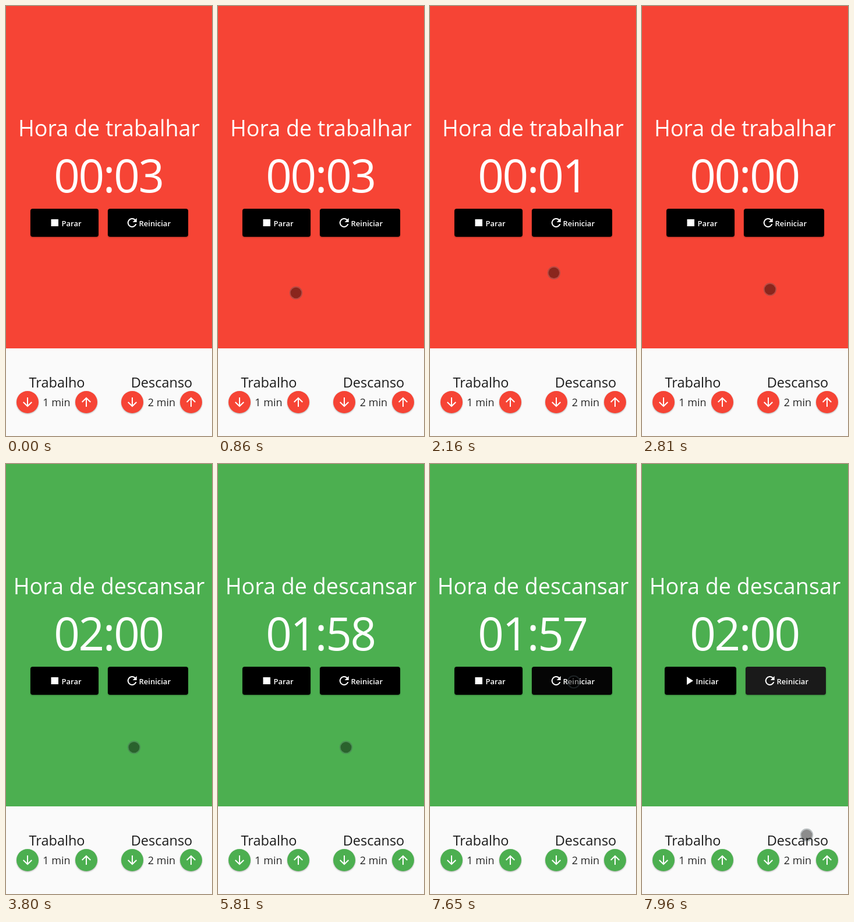
These frames come from a looping animation (354x736 px, 7.99 s). An HTML page:

```html
<!DOCTYPE html>
<html lang="pt">
<head>
<meta charset="utf-8">
<title>Temporizador</title>
<style>
  html, body { margin: 0; width: 100%; height: 100%; overflow: hidden; }
  svg { display: block; width: 100vw; height: 100vh; font-family: "Open Sans", "Noto Sans", sans-serif; }
  .center { text-anchor: middle; }
  .title { font-size: 37.7px; fill: #fff; }
  .timer { font-size: 78px; letter-spacing: -.03em; fill: #fff; }
  .raised { filter: drop-shadow(0 1.5px 1px rgba(0, 0, 0, .3)); }
  .label { font-size: 13px; font-weight: 600; fill: #fff; }
  .heading { font-size: 23.5px; fill: #1c1c1c; }
  .minutes { font-size: 18px; fill: #262626; }
</style>
</head>
<body>
<svg id="stage" viewBox="0 0 354 736">
  <defs>
    <path id="arrow" d="M0-8V7M-7.3 0L0 7L7.3 0" fill="none" stroke="#fff" stroke-width="2"/>
    <g id="stepper">
      <g class="raised" fill="currentColor">
        <circle cx="-50.5" r="19"/>
        <circle cx="50.5" r="19"/>
      </g>
      <use href="#arrow" x="-50.5"/>
      <use href="#arrow" x="-50.5" transform="rotate(180)"/>
    </g>
  </defs>

  <rect width="354" height="736" fill="#fafafa"/>
  <rect width="354" height="586" fill="currentColor"/>
  <text id="title" class="center title" x="177" y="223"></text>
  <text id="timer" class="center timer" x="176" y="319"></text>

  <g id="stop">
    <rect class="raised" x="42" y="347" width="117" height="48" rx="4"/>
    <path d="M77.5 365h12.5v12h-12.5z" fill="#fff"/>
    <text class="label" x="95.5" y="377">Parar</text>
  </g>
  <g id="start">
    <rect class="raised" x="39" y="347" width="123" height="48" rx="4"/>
    <path d="M77 364v14l11-7z" fill="#fff"/>
    <text class="label" x="92.5" y="377">Iniciar</text>
  </g>
  <g id="restart">
    <rect class="raised" x="175" y="347" width="138" height="48" rx="4"/>
    <rect id="highlight" x="175" y="347" width="138" height="48" rx="4" fill="#fff"/>
    <path transform="translate(204.7 359)" fill="#fff" d="M17.65 6.35A8 8 0 1 0 19.73 14h-2.08A6 6 0 1 1 16.22 7.78L13 11h7V4z"/>
    <text class="label" x="228.5" y="377">Reiniciar</text>
  </g>

  <text class="center heading" x="87.5" y="653">Trabalho</text>
  <text class="center heading" x="267.5" y="653">Descanso</text>
  <text class="center minutes" x="87" y="685">1 min</text>
  <text class="center minutes" x="267.5" y="685">2 min</text>
  <use href="#stepper" x="87.5" y="678"/>
  <use href="#stepper" x="267.5" y="678"/>

  <g id="cursor">
    <circle r="10.2" fill="none" stroke="rgba(75,90,95,.36)" stroke-width="2"/>
    <circle r="9.3" fill="rgba(0,0,0,.44)"/>
  </g>
</svg>
<script>
  const LOOP = 7990, ENTER = 330, REST = 3800, PRESS = 7610, RESET = 7710;
  const el = id => document.getElementById(id);
  const clamp = v => Math.max(0, Math.min(1, v));
  const progress = (t, from, to) => clamp((t - from) / (to - from));
  const mix = (a, b, u) => a + (b - a) * u;

  // Places where the pointer rests.
  const edge = [331, 734], left = [134, 491], middle = [220, 485], button = [247, 373], exit = [283, 635];

  // Decelerating move along a curve bent towards `via`.
  function glide(u, from, via, to) {
    const e = 1 - (1 - u) ** 2;
    return from.map((a, k) => mix(mix(a, via[k], e), mix(via[k], to[k], e), e));
  }

  // Loops around a drifting centre, opening quickly and closing slowly.
  function swirl(u, from, to) {
    const size = Math.min(1, 12 * u, 3 * (1 - u));
    const angle = 2 * Math.PI * 2.75 * u;
    return [
      mix(from[0], to[0], u) - 74 * size * Math.sin(angle),
      mix(from[1], to[1], u) - 36 * size * Math.cos(angle)
    ];
  }

  function pointerAt(t) {
    if (t < 1450) return glide(progress(t, ENTER, 860), edge, [250, 460], left);
    if (t < 6570) return swirl(progress(t, 1450, 2450), left, middle);
    if (t < RESET) return glide(progress(t, 6570, 7170), middle, [225, 410], button);
    return glide(progress(t, 7770, 7960), button, [249, 497], exit);
  }

  function secondsLeft(t) {
    if (t < REST) return Math.max(0, Math.min(3, Math.ceil((2810 - t) / 925)));
    return 120 - (t < RESET ? Math.floor((t - REST) / 1000) : 0);
  }

  const twoDigits = n => String(n).padStart(2, '0');
  const clock = s => twoDigits(Math.floor(s / 60)) + ':' + twoDigits(s % 60);
  const show = (id, visible) => el(id).setAttribute('display', visible ? 'inline' : 'none');

  function draw(t) {
    const resting = t >= REST, reset = t >= RESET;
    el('stage').style.color = resting ? '#4caf50' : '#f64435';
    el('title').textContent = resting ? 'Hora de descansar' : 'Hora de trabalhar';
    el('timer').textContent = clock(secondsLeft(t));
    show('stop', !reset);
    show('start', reset);
    show('cursor', t >= ENTER);
    el('restart').setAttribute('transform', `translate(${reset ? 3 : 0} 0)`);
    el('highlight').setAttribute('opacity', .1 * progress(t, PRESS, PRESS + 200));
    el('cursor').setAttribute('transform', `translate(${pointerAt(t)})`);
  }

  const began = performance.now();
  function frame() {
    draw((performance.now() - began) % LOOP);
    requestAnimationFrame(frame);
  }
  frame();
</script>
</body>
</html>
```
